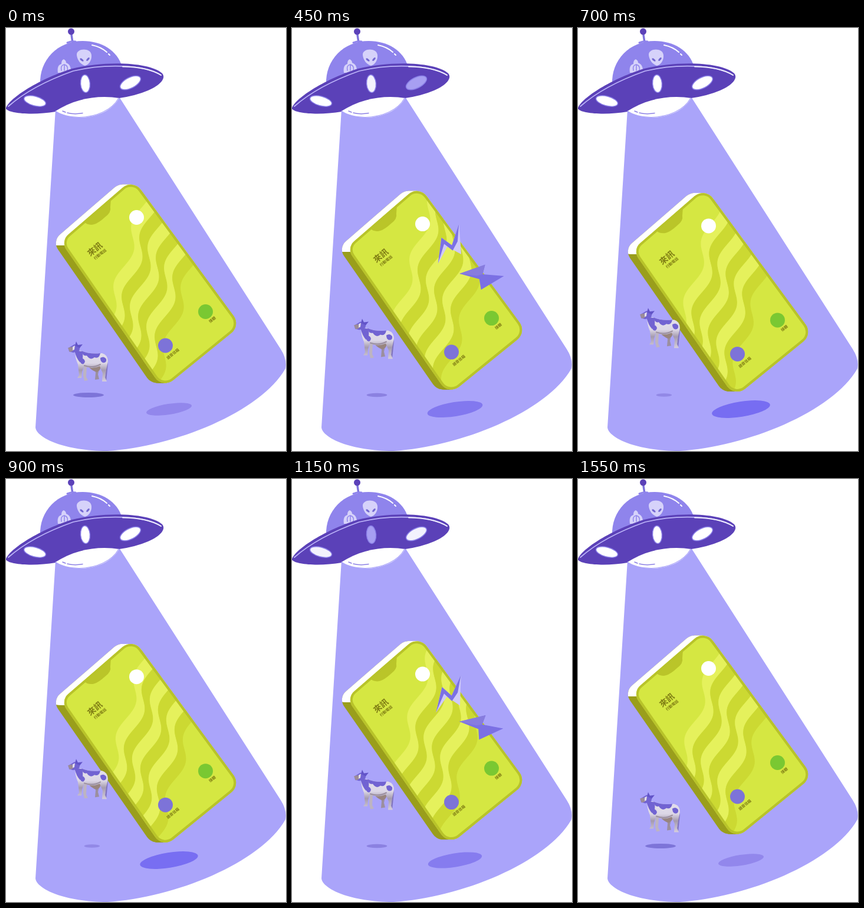
An HTML page with a canvas that plays this animation: 475x718 px, repeating every 1.6 s.

```html
<!DOCTYPE html>
<html lang="zh-Hant">
<head>
<meta charset="utf-8">
<title>Abduction</title>
<style>
html, body { margin: 0; width: 100%; height: 100%; overflow: hidden; background: #fff; }
canvas { display: block; width: 475px; height: 718px; }
</style>
</head>
<body>
<canvas id="stage" width="475" height="718"></canvas>
<script>
const ctx = document.getElementById('stage').getContext('2d');
const LOOP = 1600, STEP = 50, TAU = Math.PI * 2;
const clamp = v => Math.max(0, Math.min(1, v));
const mix = (a, b, p) => a + (b - a) * p;
const rgb = (a, b, p) => `rgb(${a.map((v, i) => Math.round(mix(v, b[i], p))).join()})`;

// Cubic ease with horizontal handles at x1 and x2.
function ease(x, x1, x2) {
  let lo = 0, hi = 1;
  for (let i = 0; i < 20; i++) {
    const s = (lo + hi) / 2, r = 1 - s;
    if (3 * r * r * s * x1 + 3 * r * s * s * x2 + s * s * s < x) lo = s; else hi = s;
  }
  return lo * lo * (3 - 2 * lo);
}

function fill(d, color) {
  ctx.fillStyle = color;
  ctx.fill(new Path2D(d));
}
function line(d, color, width = 1.5) {
  ctx.strokeStyle = color;
  ctx.lineWidth = width;
  ctx.lineCap = ctx.lineJoin = 'round';
  ctx.stroke(new Path2D(d));
}
function oval(x, y, rx, ry, deg, color, outline) {
  ctx.beginPath();
  ctx.ellipse(x, y, rx, ry, deg * Math.PI / 180, 0, TAU);
  ctx.fillStyle = color;
  ctx.fill();
  if (outline) {
    ctx.strokeStyle = outline;
    ctx.lineWidth = 1.5;
    ctx.stroke();
  }
}
const disc = (x, y, r, color) => oval(x, y, r, r, 0, color);

function at(x, y, deg, draw) {
  ctx.save();
  ctx.translate(x, y);
  ctx.rotate(deg * Math.PI / 180);
  draw();
  ctx.restore();
}
function label(text, x, y, size) {
  at(x, y, -39, () => {
    ctx.font = `bold ${size}px "Noto Sans CJK TC", "Noto Sans CJK", sans-serif`;
    ctx.textAlign = 'center';
    ctx.textBaseline = 'middle';
    ctx.fillStyle = '#7f7d14';
    ctx.fillText(text, 0, 0);
  });
}

function drawBeam() {
  fill('M84 138 L50 678 C52 696 100 718 172 718 C285 711 432 652 474 578 Q477 562 466 545 L192 117 Z', '#aaa4fa');
}

function drawSaucer(phase) {
  const violet = '#5b41b8', mid = '#8f84ec', pale = '#d6d2fa';
  line('M113 25 L110.5 8', '#7e74dc', 3.5);
  disc(110.5, 6, 5.5, violet);
  fill('M58 96 C56 54 88 22 130 22 C162 22 189 38 197 66 Z', mid);
  line('M104 25 Q111 22 118 23', mid, 3);
  line('M146 29 Q161 32 171 41 M174 44 L176 46', '#fff', 2);

  fill('M120 46 C119 34 144 33 145 46 C146 56 139 63 134 64 C127 62 121 55 120 46 Z', pale);
  oval(128.5, 54, 3.6, 1.7, 38, '#7469d2');
  oval(139, 53, 3.6, 1.7, -50, '#7469d2');
  fill('M88 76 Q86 63 94 61 Q94 54 98 53 Q102 55 102 59 Q111 62 110 76 Z', pale);
  line('M94 72 Q92 63 99 62 Q106 64 104 72 M99 63 L99 72', mid, 1.5);

  fill('M0 137 C2 122 52 88 112 69 C170 55 244 58 265 77 C272 85 262 97 241 106 Q220 115 192 119 L84 142 C50 148 6 146 0 137 Z', violet);
  line('M4 133 C28 112 66 90 114 73 C168 60 236 62 263 80', '#bdb5fa', 1.7);
  line('M198 65.5 Q240 66 263 80', '#f0eeff', 1.8);
  fill('M84 141 C116 120 157 113 192 119 C180 140 154 152 124 152 Q99 151 84 141 Z', '#fff');
  line('M84 141 Q98 151 124 151.5 C154 151 180 139 191 119', '#aaa4fa', 1.2);
  line('M96 141 L101 143 M104 144 Q116 147 130 144.5', '#8c80e4', 1.5);

  [[49, 124, 19, 8, 15, 235], [134.5, 94.5, 8, 15, -4, 335], [211, 93, 19, 9, -27, 465]]
    .forEach(([x, y, rx, ry, deg, peak]) => {
      const dim = clamp(1.2 * (1 - Math.abs(phase - peak) / 130));
      oval(x, y, rx, ry, deg, rgb([255, 255, 255], [167, 159, 242], dim), '#8a7fe8');
    });
}

function facePath(dx = 0) {
  const pts = [[92.5, 362], [215, 256], [398, 505], [266, 612]];
  const path = new Path2D();
  path.moveTo(153.75 + dx, 309);
  [1, 2, 3, 0].forEach(i => {
    const [x, y] = pts[i], [nx, ny] = pts[(i + 1) % 4];
    path.arcTo(x + dx, y, nx + dx, ny, i ? 21 : 19);
  });
  path.closePath();
  return path;
}

function drawWaves(phase) {
  const point = (k, s) => [
    232 + 14 * k - 0.3 * s + 9 * Math.cos(TAU * ((s - 82) / 100 + phase / 800)),
    298 + 17 * k + s
  ];
  for (let k = 0; k < 6; k++) {
    ctx.beginPath();
    for (let s = -50; s <= 260; s += 4) ctx.lineTo(...point(k, s));
    for (let s = 260; s >= -50; s -= 4) ctx.lineTo(...point(k + 1, s));
    ctx.fillStyle = k % 2 ? '#ccd932' : '#e5f15c';
    ctx.fill();
  }
}

function drawBody(color) {
  ctx.fillStyle = color;
  for (let dx = -14; dx <= 0; dx++) ctx.fill(facePath(dx));
}

function drawPhone(phase) {
  drawBody('#9a9e1c');
  ctx.save();
  ctx.beginPath();
  ctx.rect(70, 250, 160, 119);
  ctx.clip();
  drawBody('#fff');
  ctx.restore();

  const face = facePath();
  ctx.fillStyle = '#d5e742';
  ctx.fill(face);
  ctx.save();
  ctx.clip(face);
  drawWaves(phase);
  fill('M132 329 Q140 336 150 333 Q157 331 168 321 Q179 313 177 304 L178 290 Z', '#bac529');
  ctx.strokeStyle = '#b8c32a';
  ctx.lineWidth = 8;
  ctx.stroke(face);
  ctx.restore();

  disc(221.5, 321.5, 12.5, '#fff');
  disc(270.5, 539, 12.5, '#7d73d8');
  disc(338.5, 481.5, 12.5, '#7ac832');
  label('來訊', 150.5, 375, 14);
  label('行動電話', 159.5, 384, 6.3);
  label('語音信箱', 283, 553, 6.3);
  label('接聽', 350, 495, 6.3);
}

function drawBolts(phase) {
  const alpha = Math.min(clamp((phase - 130) / 160), clamp((650 - phase) / 150));
  if (!alpha) return;
  const tilt = 3.4 * Math.sin(TAU * (phase - 250) / 300);
  ctx.save();
  ctx.globalAlpha = alpha;
  at(266, 354, tilt, () => {
    fill('M-20 34 L-12 -10 L5 4 L19 -32 L20 20 L-3 6 Z', '#cfc9f8');
    fill('M-20 34 L-12 -10 L5 4 L19 -32 L15 -2 L6 13 L-8 1 Z', '#7b70e4');
  });
  at(321, 400, tilt, () => {
    fill('M-37 4 L7 -9 L2 7 L38 12 L-2 33 L-4 15 Z', '#7b70e4');
    fill('M-37 4 L7 -9 L2 7 L-8 9 Z', '#877cde');
  });
  ctx.restore();
}

function drawCow() {
  const purple = '#7163d2', shade = '#9b8f9f';
  const hide = ctx.createLinearGradient(0, 552, 0, 600);
  hide.addColorStop(0, '#e2deeb');
  hide.addColorStop(0.35, '#dcd7e6');
  hide.addColorStop(0.6, '#a59bae');
  hide.addColorStop(1, '#d5cedd');
  fill('M132 572 L137 574 L136 592 L139 598 L133 599 L131 590 Z', '#bdb4c2');
  fill('M151 570 L159 574 L156 588 L158 596 L151 597 L152 586 Z', shade);
  fill('M139 574 L162 572 Q160 583 153 584 Q145 581 139 574 Z', '#98857f');
  line('M168 558 Q173 564 171 578 L169 597', '#8175bd', 2.5);
  fill('M117 547 L128 548 Q142 554 163 552 Q173 555 173 566 L170 580 L168 593 L171 600 L163 600 L164 586 L159 574 Q146 580 132 574 L129 584 L128 594 L121 594 L124 589 L122 571 Q117 560 117 547 Z', hide);
  fill('M128 548 Q142 554 160 552 Q158 562 150 559 Q143 565 137 556 Q130 558 128 548 Z', purple);
  fill('M116 547 L129 549 Q133 562 126 568 Q119 561 116 547 Z', purple);
  fill('M160 560 Q166 556 170 562 Q171 569 164 568 Q160 566 160 560 Z', purple);
  fill('M126 562 Q132 559 134 566 Q132 573 127 569 Z', purple);
  line('M133 573 Q147 578 160 571', shade, 2);
  fill('M106 543 L116 537 L126 540 L124 548 L114 551 L107 549 Z', purple);
  fill('M105 543 L112 541 L114 548 L108 550 Z', '#9c8c98');
  fill('M117 539 L119 532 L122 538 L130 537 L125 543 Z', '#6254c8');
  fill('M113 541 L117 539 L116 546 L113 547 Z', '#e2deeb');
}

function drawShadows(lift, drop) {
  oval(mix(140, 146, lift), 623, mix(26, 13, lift), mix(4, 2.7, lift), 0,
    rgb([125, 116, 216], [146, 136, 230], lift));
  oval(276.5, 647, mix(39, 50, drop), mix(9, 13, drop), -9,
    rgb([146, 135, 236], [118, 109, 242], drop * drop));
}

function render(t) {
  const phase = t % 800;
  const drop = ease(clamp(Math.min(t, 1550 - t) / 775), 0.42, 0.4);
  const lift = ease(Math.min(t, LOOP - t) / 800, 0.42, 0.5);
  ctx.clearRect(0, 0, 475, 718);
  drawBeam();
  drawSaucer(phase);
  drawShadows(lift, drop);
  at(0, 14.6 * drop, 0, () => {
    drawPhone(phase);
    drawBolts(phase);
  });
  at(0, -58 * lift, 0, drawCow);
}

const start = performance.now();
function tick() {
  const elapsed = (performance.now() - start) % LOOP;
  render(Math.floor(elapsed / STEP) * STEP);
  requestAnimationFrame(tick);
}
tick();
</script>
</body>
</html>
```
